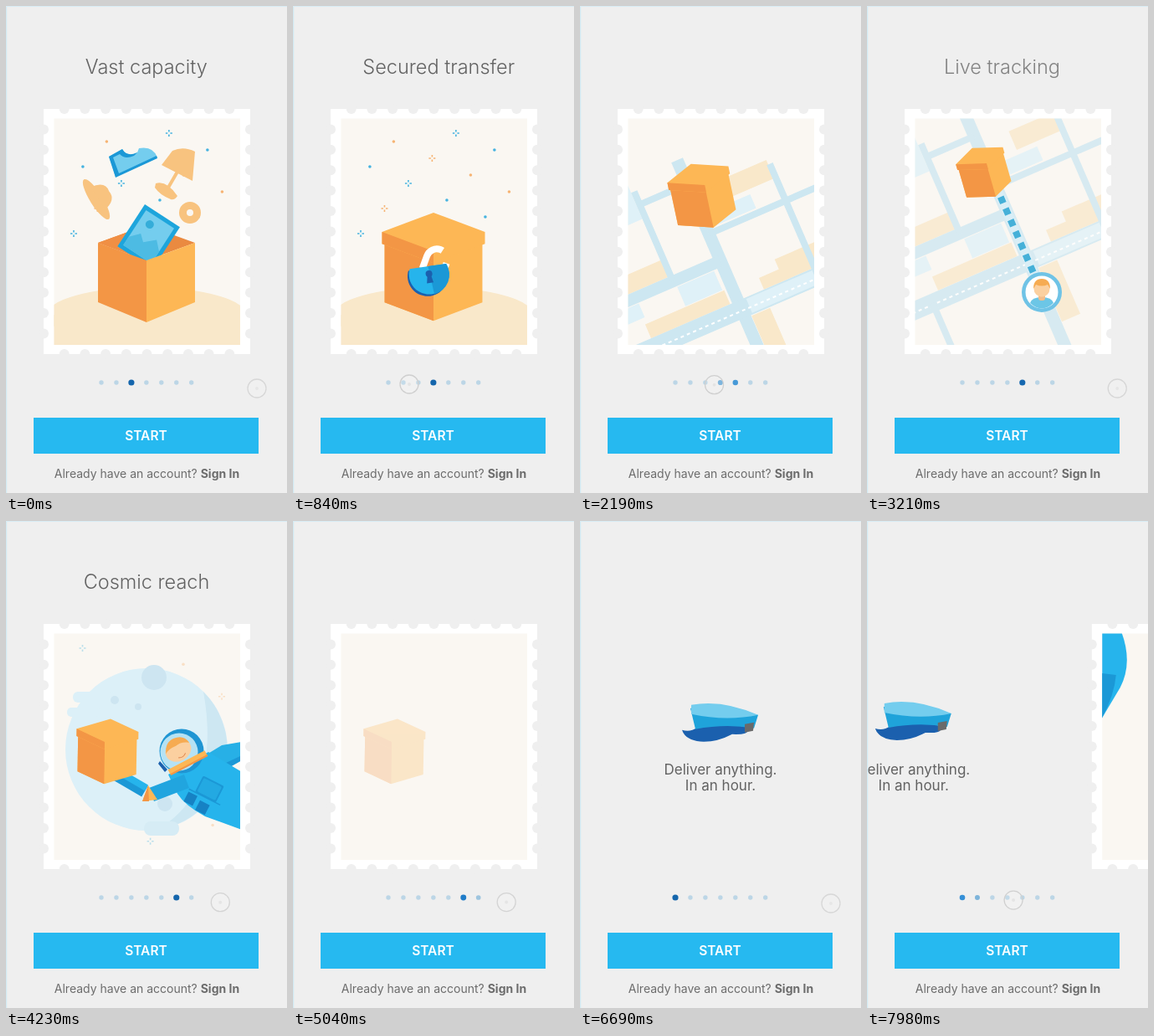
Write an HTML page that moves like this. It is 336x582 px and loops after 8000 ms.

```html
<!DOCTYPE html>
<html lang="en">
<head>
<meta charset="utf-8">
<title>Onboarding</title>
<style>
html, body { margin: 0; width: 100%; height: 100%; overflow: hidden; background: #efefef; }
svg { display: block; width: 336px; height: 582px; font-family: Inter, "Open Sans", sans-serif; }
text { text-anchor: middle; fill: #626262; }
.title { font-size: 23.5px; font-weight: 350; }
.lead { font-size: 17px; }
.start { font-size: 15.5px; font-weight: 600; fill: #fff; }
.account { font-size: 14px; fill: #6c6c6c; }
</style>
</head>
<body>
<svg id="stage" viewBox="0 0 336 582"></svg>
<script>
const LOOP = 8000, PERIOD = 1590, RESTART = 6240, LAST_SWIPE = 7440;
const BG = '#efefef', PAPER = '#faf7f2', BLUE = '#26b4ec', DEEP = '#1b98d6', NAVY = '#1b60ae',
  SKY = '#74cdee', ORANGE = '#f39645', GOLD = '#fdb755', TAN = '#f8c37f', SAND = '#f9e8ca',
  ROAD = '#cde7f1', PALE = '#dff1f8', SKIN = '#fbd0a0', HAIR = '#f6ab52';

const $ = id => document.getElementById(id);
const clamp = v => Math.max(0, Math.min(1, v));
const mix = (a, b, k) => a + (b - a) * k;
const smooth = v => { const k = clamp(v); return k * k * (3 - 2 * k); };

const path = (d, fill, more = '') => `<path d="${d}" fill="${fill}" ${more}/>`;
const line = (d, stroke, w, more = '') => `<path d="${d}" fill="none" stroke="${stroke}" stroke-width="${w}" ${more}/>`;
const disc = (x, y, r, fill, more = '') => `<circle cx="${x}" cy="${y}" r="${r}" fill="${fill}" ${more}/>`;
const oval = (x, y, rx, ry, fill) => `<ellipse cx="${x}" cy="${y}" rx="${rx}" ry="${ry}" fill="${fill}"/>`;
const rect = (x, y, w, h, fill, rx = 0) => `<rect x="${x}" y="${y}" width="${w}" height="${h}" fill="${fill}" rx="${rx}"/>`;
const group = (id, body, more = '') => `<g id="${id}" ${more}>${body}</g>`;
const repeat = (n, f) => Array.from({ length: n }, (_, i) => f(i)).join('');

// dots and four-point sparks spread by the golden ratio
function confetti(shift, height = 130) {
  return repeat(13, i => {
    const x = 72 + 195 * ((i * .618 + shift) % 1), y = 152 + height * i / 13;
    const colour = i % 2 ? '#f6b474' : '#45b3e0';
    return i % 3 ? disc(x, y, 1.8, colour)
      : line(`M${x - 4} ${y}h2.5m3 0h2.5M${x} ${y - 4}v2.5m0 3v2.5`, colour, 1.6);
  });
}

const items = [
  [108, 231, '<g transform="translate(108 231) rotate(58)">' + oval(0, 0, 28, 7.5, TAN) +
    path('M-16-2Q-13-21 0-18Q13-20 16-2Z', TAN) + '</g>'],
  [152, 187, path('M123 180L139 171Q145 181 157 175L159 170Q176 167 181 181L131 204Z', SKY) +
    path('M123 180L139 171Q145 181 157 175L153 179Q142 184 136 177L128 181L135 200L180 179L181 182L131 205Z', DEEP)],
  [203, 200, path('M199 173Q212 167 226 174L223 209L186 190Z', TAN) + line('M205 198L194 217', TAN, 4) +
    path('M179 212Q192 208 205 227Q202 232 197 231Q184 226 178 217Z', TAN)],
  [220, 247, disc(220, 247, 8.5, 'none', `stroke="${TAN}" stroke-width="9"`)],
  [168, 270, '<g transform="translate(166 237) rotate(33)">' + rect(0, 0, 50, 60, '#1da5dc') +
    rect(5, 5, 40, 50, SKY) + disc(18, 17, 5, '#35add9') +
    path('M5 43L15 32L23 39L35 28L45 38V55H5Z', '#4dbbe3') + '</g>']
];

const desert = oval(168, 370, 120, 34, SAND) + rect(57, 369, 223, 40, SAND) + confetti(.63);

const openBox = path('M110 283L168 262L226 283L168 304Z', '#ea8a40') +
  path('M110 283L168 262V304Z', '#f08f44') +
  items.map(([, , shape], i) => group('item' + i, shape)).join('') +
  path('M110 283L168 304V378L110 354Z', ORANGE) + path('M168 304L226 283V354L168 378Z', GOLD);

const lockBody = 'M-22-12H22A24 24 0 1 1-22-12Z';
const lock = line('M-11-6V-22A12.5 12.5 0 0 1 14-22V-6', '#fff', 8, 'id="shackle" transform="rotate(20)" pathLength="100"') +
  '<g transform="rotate(-8)">' + path(lockBody, NAVY, 'transform="translate(-2 2)"') + path(lockBody, BLUE) +
  path('M0-12H22A24 24 0 0 1 3 22Z', DEEP) + disc(0, -3, 4, NAVY) + path('M-2-2H2L4 8H-4Z', NAVY) + '</g>';

// streets run along the axes; the whole map is tilted later
const map =
  path('M40-192h58v24h-58zM60-79h70v28h-70zM34-66h28v15h-28zM-130-132h66v22h-66zM-113-69h103v18h-103zM8-28h24v70h-24z', SAND) +
  path('M-92-236h26v50h-26zM-60-95h48v25h-48zM14-162h50v18h-50zM-180-95h70v18h-70z', PALE) +
  line('M0-234V240', ROAD, 15) + line('M-240-40H240', ROAD, 22) + rect(10, -49, 230, 18, PALE) +
  line('M-240-38H240', '#fff', 2, 'stroke-dasharray="4 4"') + line('M-240-103H0', ROAD, 14) +
  line('M0-138H180M-62-220V-103M-62-203H0M100-186V-40M-125-40V90', ROAD, 8);

const route = line('M0-142V-18', '#d9eef6', 11) + line('M0-139V-18', '#45b0d8', 8, 'stroke-dasharray="8 7"');
const avatar = disc(0, 0, 24, '#6fc3e6') + disc(0, 0, 19.5, '#fff') +
  path('M-14 13Q-12 6 0 6Q12 6 14 13Q0 26-14 13Z', '#6cc6e6') +
  rect(-4, 0, 8, 10, '#f3bd8a', 3) + disc(0, -4, 9.5, SKIN) +
  path('M-10-4Q-10-16 0-16Q10-16 10-4L7-9Q0-6-7-9Z', HAIR);

const planet = group('stars', confetti(.1, 250), 'opacity=".35"') + disc(168, 273, 97, '#dcf0f8') +
  path('M236 204A97 97 0 0 1 180 369Q258 326 236 204Z', '#cde7f2') +
  rect(80, 204, 50, 13, '#dcf0f8', 6) + rect(73, 223, 40, 11, '#dcf0f8', 5) + rect(165, 359, 42, 17, '#d6ecf5', 8) +
  disc(177, 187, 15, '#cde5f1') + disc(130, 214, 5, '#cde5f1') + disc(158, 222, 4, '#cde5f1') + disc(190, 338, 9, '#cde5f1');

const astronaut = path('M230 285L258 268L282 264V284L245 300Z', '#27b0e6') + path('M244 298L282 280V286L250 304Z', DEEP) +
  line('M166 323L130 302', DEEP, 15) + line('M168 319L132 298', BLUE, 8) +
  path('M194 303L242 276L282 300V369L238 353Q214 340 205 326Z', BLUE) +
  line('M216 311L174 327', '#21a5df', 17) + path('M163 335L170 316L181 333Z', GOLD) + path('M163 335L170 316L171 335Z', ORANGE) +
  '<g transform="translate(226 306) rotate(27)">' + rect(8, -6, 28, 22, DEEP, 2) + rect(10, -4, 24, 18, '#23a9e2', 2) +
  rect(1, 19, 12, 13, '#1682c4') + rect(18, 22, 13, 13, '#1682c4') + line('M0 16H42', DEEP, 1.5) + '</g>' +
  path('M184 287L193 297L190 300L182 290Z', NAVY) + disc(210, 275, 26.5, '#1f95d3') + disc(207, 276, 22.5, '#b5e2f4') +
  '<g transform="translate(206 274) rotate(-28)">' + oval(0, 0, 16, 13, SKIN) +
  path('M-15-3Q-10-16 2-15Q14-14 16-2Q8-8 0-6Q-10-7-15-3Z', HAIR) +
  line('M-4 8Q1 11 6 7', '#e08c55', 1.2) + '</g>' +
  line('M195 300L239 277', GOLD, 6) + line('M197 303L241 280', ORANGE, 2);

// coins piled from the ground line upwards
const pile = (x, w, n) => repeat(n, i =>
  rect(x + i % 3, 333 - i * 5, w, 4.3, SAND) + rect(x + i % 3 + 5, 337 - i * 5, w - 12, .8, '#f6d9a6'));
const wallet = pile(56, 50, 6) + pile(93, 24, 14) + pile(215, 27, 10) + pile(238, 45, 7) +
  rect(57, 338, 223, 70, '#f9e6c6') + confetti(.4) +
  group('coin', disc(167, 222, 20, '#fbb758') + disc(167, 222, 15.5, '#f2973f') +
    '<text x="167" y="230.5" font-size="23" font-weight="800" style="fill:#fdbc60">2</text>') +
  path('M135 278L187 249Q194 245 197 250L212 280Z', GOLD) + path('M146 280L196 251L200 257L160 280Z', DEEP) +
  rect(109, 273, 122, 74, '#25b1ea', 8) + rect(109, 338, 122, 9, '#20a3de', 4) +
  line('M120 286H226M120 339H226', '#1688c6', 1.3, 'stroke-dasharray="6 4"') +
  rect(191, 304, 38, 22, DEEP, 9) + rect(194, 303, 39, 19, NAVY, 7) + disc(203.5, 312, 6.5, '#fba04a') + disc(202.5, 311, 4, GOLD);

const balloon = path('M40 134H81Q94 170 79 199L57 236H40Z', BLUE) + path('M57 236V182L74 184Q72 208 57 236Z', DEEP);

const cap = path('M122 248Q132 251 140 245Q175 238 200 245Q205 254 182 253Q165 262 148 262Q126 261 122 248Z', NAVY) +
  path('M132 222L213 230L208 246Q175 240 138 247Z', '#1fa3da') +
  path('M133 218Q170 211 213 230Q175 238 133 229Z', SKY) + path('M197 241L208 239L207 249L197 251Z', '#6a6a6a');

const titles = ['', '', 'Vast capacity', 'Secured transfer', 'Live tracking', 'Cosmic reach', 'Lowest prices'];

$('stage').innerHTML =
  '<clipPath id="window"><rect x="57.5" y="134.5" width="222.5" height="270.5"/></clipPath>' +
  rect(0, 0, 336, 582, BG) +
  group('intro', group('cap', cap) + '<text class="lead" x="168" y="303">Deliver anything.</text>' +
    '<text class="lead" x="168" y="322">In an hour.</text>') +
  titles.map((s, i) => `<text class="title" id="title${i}" y="81">${s}</text>`).join('') +
  group('stamp', rect(45, 123, 247, 293, '#fff') +
    repeat(9, i => disc(69.7 + i * 24.7, 123, 6, BG) + disc(69.7 + i * 24.7, 416, 6, BG)) +
    repeat(11, i => disc(45, 147.4 + i * 24.4, 6, BG) + disc(292, 147.4 + i * 24.4, 6, BG)) +
    '<g clip-path="url(#window)">' + rect(57, 134, 224, 272, PAPER) +
    group('balloon', balloon) + group('desert', desert) + group('open', openBox) + group('map', map) +
    group('track', group('route', route) + group('avatar', avatar)) +
    group('planet', planet) + group('astronaut', astronaut) + group('box', '') +
    group('lock', lock) + group('wallet', wallet) + '</g>') +
  repeat(7, i => disc(114 + i * 17.95, 450, 2.7, '', `id="dot${i}"`)) +
  rect(33, 492, 269, 43, '#26b9f0') + '<text class="start" x="167.5" y="519">START</text>' +
  '<text class="account" x="168.5" y="564">Already have an account? <tspan font-weight="700">Sign In</tspan></text>' +
  group('finger', disc(0, 0, 11, '#fff', 'fill-opacity=".12" stroke="#cfcfcf" stroke-width="1.3"') + disc(0, 0, 2, '#e4e4e4')) +
  rect(0, 0, 1.2, 582, '#d3eaf4') + rect(0, 0, 336, 1, '#d9edf5');

// near top corner, edge length, turn and roll in degrees, from page 3 on
const poses = [
  { x: 168, y: 293, size: 87, turn: 45, roll: 0 },
  { x: 143, y: 188, size: 43, turn: 34, roll: -16 },
  { x: 118, y: 264, size: 52.5, turn: 50, roll: 1 }
];

function poseAt(page) {
  const at = Math.max(0, Math.min(2, page - 3)), i = Math.min(1, Math.floor(at));
  const k = smooth((at - i) * 1.15);
  return Object.fromEntries(Object.keys(poses[0]).map(key => [key, mix(poses[i][key], poses[i + 1][key], k)]));
}

function drawBox({ x, y, size, turn, roll }) {
  const rad = Math.PI / 180, s = Math.sin(turn * rad) * size, c = Math.cos(turn * rad) * size;
  const lean = Math.sin(22 * rad), height = size * .97;
  const corner = (u, v, w, spread) => {
    const [p, q] = [u, v].map(n => .5 + (n - .5) * spread);
    return `${s * q - c * p} ${-(s * p + c * q) * lean + height * w}`;
  };
  const prism = (top, base, spread) => {
    const poly = (...pts) => 'M' + pts.map(([u, v, w]) => corner(u, v, w, spread)).join('L') + 'Z';
    return path(poly([1, 0, top], [1, 1, top], [0, 1, top], [0, 1, base], [0, 0, base], [1, 0, base]), GOLD) +
      path(poly([1, 0, top], [0, 0, top], [0, 0, base], [1, 0, base]), ORANGE);
  };
  move('box', `translate(${x} ${y}) rotate(${roll})`);
  $('box').innerHTML = prism(.1, 1, .95) + prism(0, .17, 1);
}

function show(id, opacity) {
  $(id).style.display = opacity > 0 ? '' : 'none';
  $(id).setAttribute('opacity', clamp(opacity));
}
const move = (id, value) => $(id).setAttribute('transform', value);

// visible while the page lies between first and last
const fade = (p, first, last, lead = .75) =>
  p < first ? clamp((p - first + lead) / .3) : clamp(1 - 12 * (p - last));

function render(t) {
  const rewound = t >= RESTART;
  const turn = Math.min(3, Math.floor(t / PERIOD));
  const page = rewound ? 0 : 2 + turn;
  const since = rewound ? Math.max(0, t - LAST_SWIPE) : t - turn * PERIOD;

  // the page follows the finger, then snaps after release
  const swipe = mix(clamp(since / 1620), 1, smooth((since - 540) / 155));
  const p = page + swipe;
  const press = smooth(since / 780) - smooth((since - 880) / 260);
  move('finger', `translate(${300 - 161 * press} ${457 - 5 * press})`);
  $('finger').setAttribute('opacity', mix(.75, 1, press));

  move('intro', `translate(${-336 * Math.min(1, p)} 0)`);
  move('cap', `translate(0 ${2 * Math.sin((t - 7980) / 300)})`);
  move('stamp', `translate(${336 * Math.max(0, 1 - p)} 0)`);
  titles.forEach((_, i) => {
    show('title' + i, fade(p, i, i, .3));
    $('title' + i).setAttribute('x', 168 + (i > page ? 100 * (1 - smooth((since - 400) / 520)) : -340 * swipe));
    const near = clamp(1 - Math.abs(p - i));
    $('dot' + i).setAttribute('r', mix(2.7, 3.6, near));
    $('dot' + i).setAttribute('fill', `hsl(${mix(203, 208, near)} ${mix(45, 78, near)}% ${mix(82, 38, near)}%)`);
  });

  show('balloon', p <= 1 ? 1 : 0);
  show('desert', fade(p, 2, 3));
  show('open', p < 2.85 ? fade(p, 2, 3) : 0);
  items.forEach(([x, y], i) => {
    const k = clamp((p - 2) / .55) ** 1.5;
    const bob = Math.sin(t / 160 + i * Math.PI) * 1.5 * (1 - k);
    move('item' + i, `translate(${mix(x, 168, k)} ${mix(y, 332, k) + bob}) scale(${1 - .5 * k}) translate(${-x} ${-y})`);
  });

  drawBox(poseAt(p));
  show('box', Math.min((p - 2.55) * 4, 1 - (p - 5.02) * 5));
  const lockIn = clamp((p - 2.6) / .35);
  show('lock', lockIn * fade(p, 3, 3));
  move('lock', `translate(163 ${323 - 12 * (1 - lockIn)}) scale(${mix(.6, 1, lockIn)})`);
  const gap = 24 * clamp((1100 - t) / 260);
  $('shackle').setAttribute('stroke-dasharray', `${78 - gap} ${gap} 100`);

  const place = `translate(209 ${342 + (3210 - t) * .056})`;
  const arrive = smooth((t - 2350) / 300);
  show('map', fade(p, 4, 4));
  move('map', `${place} rotate(-23.4)`);
  show('track', p < 3.7 ? 0 : 1 - 4 * (p - 4.02));
  show('route', arrive);
  move('route', `${place} rotate(-23.4)`);
  move('avatar', `${place} scale(${arrive})`);

  show('planet', fade(p, 5, 5));
  show('astronaut', fade(p, 5, 5));
  move('astronaut', `translate(${110 * clamp((5 - p) / .6) ** 2} 0)`);

  show('wallet', fade(p, 6, 6));
  move('coin', `translate(0 ${60 * clamp((6 - p) / .4) + 3 * Math.sin((t - 5670) / 180)})`);
}

const begin = performance.now();
function tick(now) {
  render(Math.max(0, now - begin) % LOOP);
  requestAnimationFrame(tick);
}
render(0);
requestAnimationFrame(tick);
</script>
</body>
</html>
```
